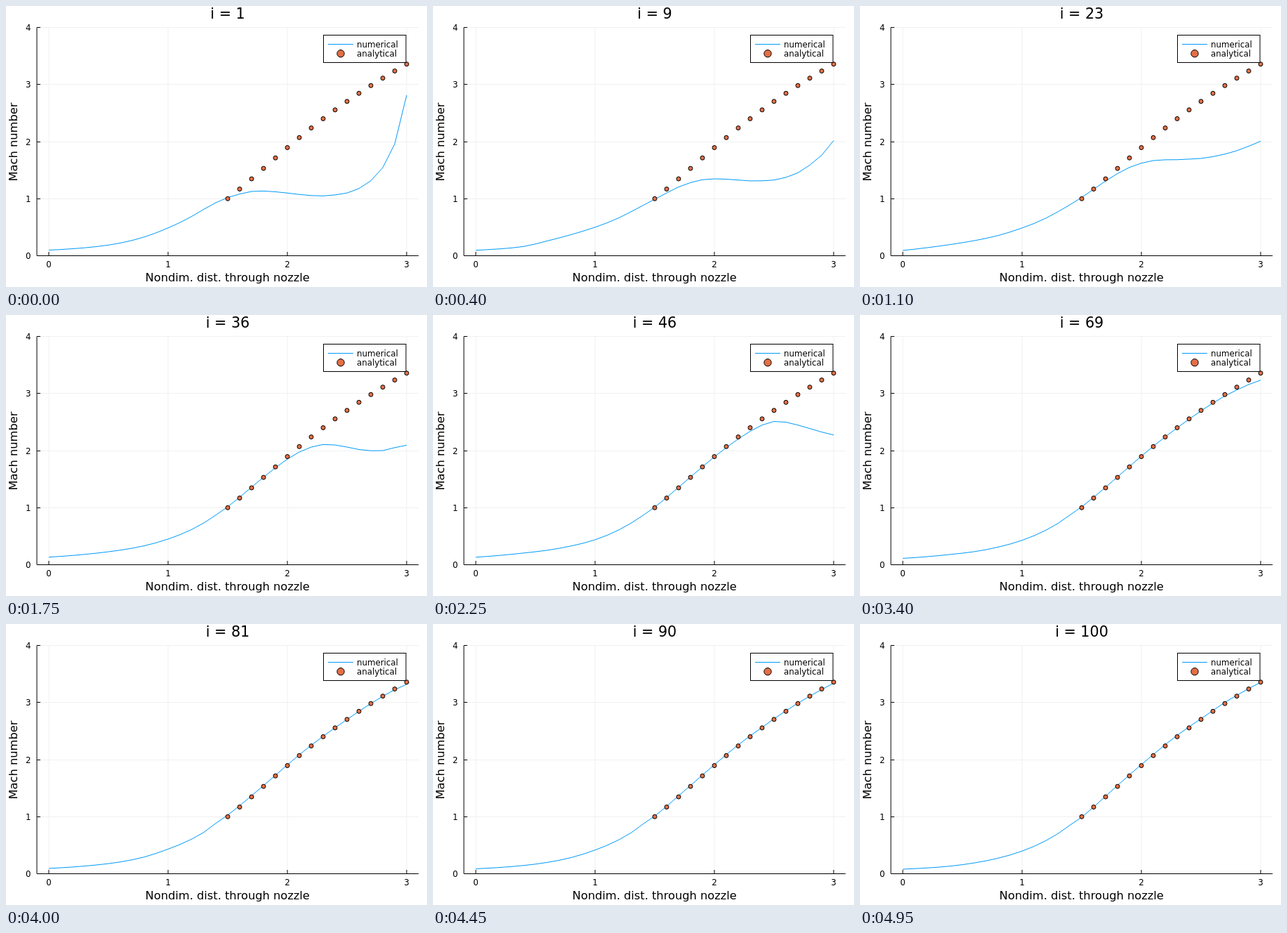
Animation of 600 by 400 pixels, one loop 5 s. Source, as an HTML page with a canvas:

```html
<!DOCTYPE html>
<html>
<head>
<meta charset="utf-8">
<style>
html, body { margin: 0; height: 100%; overflow: hidden; background: #fff; }
canvas { display: block; }
</style>
</head>
<body>
<canvas id="stage" width="600" height="400"></canvas>
<script>
const ctx = document.getElementById('stage').getContext('2d');
const BLUE = '#009af9', ORANGE = '#e26f46';
const X = x => 61 + 170 * x;
const Y = m => 355.5 - 81.2 * m;
const lerp = (a, b, u) => a + (b - a) * u;

// Steady Mach number from the area relation, A = 1 + 2.2 (x - 1.5)^2
function steady(x) {
  const area = 1 + 2.2 * (x - 1.5) ** 2, supersonic = x >= 1.5;
  let lo = supersonic ? 1 : 0.01, hi = supersonic ? 6 : 1;
  for (let n = 0; n < 40; n++) {
    const m = (lo + hi) / 2;
    const tooLarge = ((1 + 0.2 * m * m) / 1.2) ** 3 / m > area;
    if (tooLarge === supersonic) hi = m; else lo = m;
  }
  return (lo + hi) / 2;
}

// Mach numbers (in thousandths) at the knots; front = where the flow leaves the steady curve
const knots = [0, .4, .6, .8, 1, 1.3, 1.4, 1.5, 1.7, 1.9, 2.1, 2.3, 2.5, 2.6, 2.7, 2.8, 2.9, 3];
const poses = [
  { step: 1, front: 1.6, mach: [98, 160, 223, 328, 487, 815, 930, 1020, 1127, 1121, 1074, 1049, 1100, 1178, 1315, 1545, 1960, 2815] },
  { step: 9, front: 1.68, mach: [96, 162, 260, 370, 500, 770, 880, 990, 1205, 1333, 1342, 1312, 1327, 1374, 1453, 1590, 1763, 2020] },
  { step: 23, front: 1.85, mach: [93, 197, 265, 355, 487, 770, 893, 1022, 1310, 1549, 1668, 1684, 1706, 1737, 1782, 1841, 1921, 2007] },
  { step: 36, front: 2.13, mach: [133, 203, 256, 332, 450, 733, 870, 1016, 1360, 1700, 1976, 2108, 2063, 2020, 1999, 2001, 2053, 2095] },
  { step: 57, front: 2.68, mach: [130, 207, 252, 326, 425, 720, 856, 1003, 1352, 1717, 2068, 2390, 2667, 2786, 2885, 2931, 2870, 2793] },
  { step: 81, front: 3.15, mach: [93, 154, 207, 293, 432, 727, 884, 1028, 1368, 1726, 2085, 2410, 2704, 2848, 2983, 3112, 3227, 3320] },
  { step: 100, front: 3.6, mach: [80, 134, 190, 273, 397, 702, 850, 991, 1360, 1733, 2090, 2427, 2716, 2862, 3005, 3127, 3247, 3353] }
];
for (const p of poses) p.offset = p.mach.map((m, k) => m / 1000 - steady(knots[k]));

// Cubic Hermite through the knots, continued as a straight line past the outlet
function sample(v, x) {
  const last = knots.length - 1;
  const slope = (a, b) => (v[b] - v[a]) / (knots[b] - knots[a]);
  if (x >= knots[last]) return v[last] + slope(last - 1, last) * (x - knots[last]);
  let k = 0;
  while (x >= knots[k + 1]) k++;
  const h = knots[k + 1] - knots[k], u = (x - knots[k]) / h;
  const s0 = slope(Math.max(k - 1, 0), k + 1) * h;
  const s1 = slope(k, Math.min(k + 2, last)) * h;
  const d = v[k + 1] - v[k];
  return v[k] + u * (s0 + u * (3 * d - 2 * s0 - s1 + u * (s0 + s1 - 2 * d)));
}

// Carry a position from the current front to the front of a pose
function warp(x, front, to) {
  if (x < 1.5) return x;
  return x < front ? 1.5 + (x - 1.5) * (to - 1.5) / (front - 1.5) : x - front + to;
}

const stations = Array.from({ length: 31 }, (_, k) => k / 10);
const base = stations.map(steady);

function machCurve(step) {
  let k = 0;
  while (k < poses.length - 2 && step >= poses[k + 1].step) k++;
  const a = poses[k], b = poses[k + 1];
  const u = (step - a.step) / (b.step - a.step);
  const mix = k ? u : 1 - (1 - u) ** 2;
  const front = lerp(a.front, b.front, u);
  return stations.map((x, n) => base[n] + lerp(
    sample(a.offset, warp(x, front, a.front)),
    sample(b.offset, warp(x, front, b.front)), mix));
}

function line(points, color = '#000', width = 1) {
  ctx.strokeStyle = color;
  ctx.lineWidth = width;
  ctx.beginPath();
  points.forEach(([x, y]) => ctx.lineTo(x, y));
  ctx.stroke();
}

function dot(x, y, r) {
  ctx.beginPath();
  ctx.arc(x, y, r, 0, 7);
  ctx.fillStyle = ORANGE;
  ctx.fill();
  ctx.strokeStyle = '#000';
  ctx.lineWidth = 1;
  ctx.stroke();
}

function text(str, x, y, size, align = 'center') {
  ctx.font = size + 'px "DejaVu Sans", sans-serif';
  ctx.textAlign = align;
  ctx.fillStyle = '#000';
  ctx.fillText(str, x, y);
}

function drawAxes() {
  for (let n = 0; n <= 4; n++) {
    const y = Math.floor(Y(n)) + 0.5;
    line([[44, y], [588, y]], '#f0f0f0');
    if (n < 4) line([[X(n), 31], [X(n), 355]], '#f0f0f0');
  }
  line([[44, 30.5], [44, 355.5], [588, 355.5]]);
  for (let n = 0; n <= 4; n++) {
    const y = Math.floor(Y(n)) + 0.5;
    line([[44, y], [49, y]]);
    text(n, 35.5, y + 4.5, 11.8, 'right');
    if (n < 4) {
      line([[X(n), 355], [X(n), 350]]);
      text(n, X(n), 371.5, 11.8);
    }
  }
  text('Nondim. dist. through nozzle', 315.7, 392, 16.25);
  ctx.save();
  ctx.translate(16, 193.5);
  ctx.rotate(-Math.PI / 2);
  text('Mach number', 0, 0, 16.25);
  ctx.restore();
}

function drawLegend() {
  ctx.fillStyle = '#fff';
  ctx.fillRect(453, 42, 117, 38);
  ctx.strokeStyle = '#000';
  ctx.lineWidth = 1;
  ctx.strokeRect(452.5, 41.5, 117.5, 39);
  line([[459, 54.5], [495, 54.5]], BLUE);
  dot(477, 67.7, 5.2);
  text('numerical', 500, 59, 11.8, 'left');
  text('analytical', 500, 72, 11.8, 'left');
}

function draw() {
  const step = Math.floor(performance.now() % 5000 / 50) + 1;
  ctx.fillStyle = '#fff';
  ctx.fillRect(0, 0, 600, 400);
  drawAxes();
  text('i = ' + step, 316, 18, 20.7);
  line(machCurve(step).map((m, n) => [X(stations[n]), Y(m)]), BLUE);
  for (let n = 15; n <= 30; n++) dot(X(stations[n]), Y(base[n]), 3);
  drawLegend();
  requestAnimationFrame(draw);
}
draw();
</script>
</body>
</html>
```
